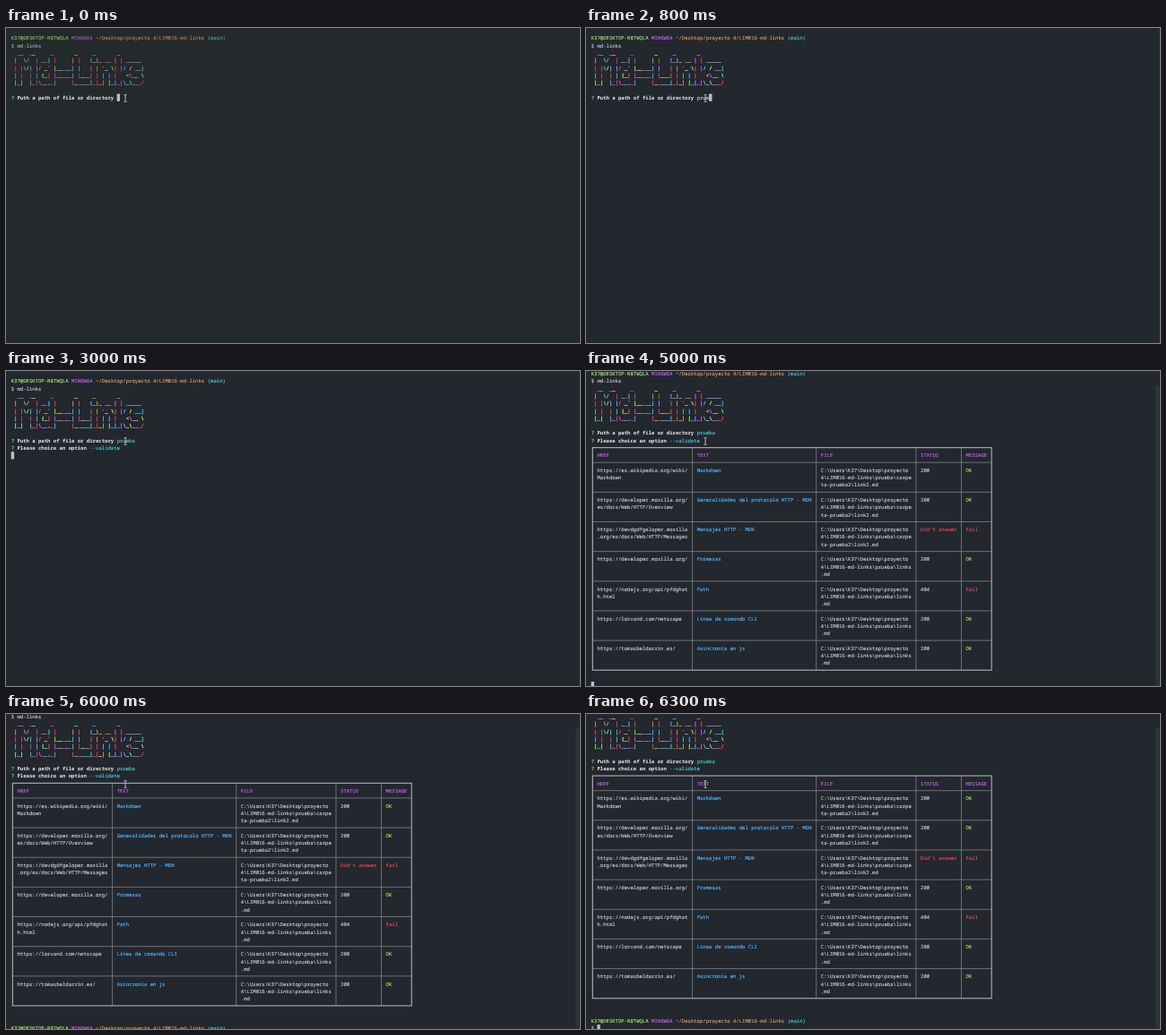
These frames come from a looping animation (640 by 352 pixels, 6400 ms). An HTML page:

```html
<!DOCTYPE html>
<html lang="en">
<head>
<meta charset="utf-8">
<title>md-links terminal</title>
<style>
  html, body { margin: 0; width: 100%; height: 100%; overflow: hidden; background: #23272e; }
  svg { display: block; width: 640px; height: 352px; }
  text {
    font: 5.617px "Noto Sans Mono", "DejaVu Sans Mono", monospace;
    white-space: pre;
    text-rendering: geometricPrecision;
    stroke: currentColor;
    stroke-width: 0.14;
  }
  .bold { font-weight: 700; stroke-width: 0; }
  .banner text { stroke-width: 0.4; }
</style>
</head>
<body>
<svg id="stage" viewBox="0 0 640 352"></svg>
<script>
const LOOP = 6400;
const CELL = 3.37, LINE = 8.29, LEFT = 5.7, TOP = 11.4;
const C = {
  fg: '#c2c8d2', white: '#ececec', red: '#e2485a', lime: '#a8e56c',
  yellow: '#d8965a', blue: '#4fb2ff', magenta: '#c45fe4', cyan: '#48c6d6'
};

const colX = c => LEFT + c * CELL;
const rowY = r => TOP + r * LINE;
const ruleY = r => rowY(r) - 0.4;

function add(parent, tag, attrs = {}, content) {
  const el = document.createElementNS('http://www.w3.org/2000/svg', tag);
  for (const k in attrs) el.setAttribute(k, attrs[k]);
  if (content !== undefined) el.textContent = content;
  return parent.appendChild(el);
}

const group = (parent, name = '') => add(parent, 'g', { class: name });

function paint(el, color) {
  el.setAttribute('fill', color);
  el.setAttribute('color', color);
}

// Each part is [string, colour, bold?]; the parts follow one another on the line.
function write(parent, row, col, ...parts) {
  for (const [str, color = C.fg, bold] of parts) {
    const el = add(parent, 'text', { x: colX(col), y: rowY(row) + 2, class: bold ? 'bold' : '' }, str);
    paint(el, color);
    col += str.length;
  }
}

function prompt(parent, row) {
  write(parent, row, 0,
    ['K37@DESKTOP-R8TWQLA', C.lime], [' MINGW64', C.magenta],
    [' ~/Desktop/proyecto 4/LIM016-md-links', C.yellow], [' (main)', C.cyan]);
}

const stage = document.getElementById('stage');
const back = add(stage, 'rect', { width: 640, height: 352 });
const bar = add(stage, 'rect', { fill: '#2d323a', height: 352 });
const screen = group(stage);

// Shell prompt and banner
const head = group(screen);
prompt(head, 0);
write(head, 1, 0, ['$ md-links']);

const banner = [
  String.raw`  __  __     _       _     _       _`,
  String.raw` |  \/  | __| |     | |   (_)_ __ | | _____`,
  String.raw` | |\/| |/ _${'`'} |_____| |   | | '_ \| |/ / __|`,
  String.raw` | |  | | (_| |_____| |___| | | | |   <\__ \ `,
  String.raw` |_|  |_|\__,_|     |_____|_|_| |_|_|\_\___/`
];
const hues = [C.red, C.lime, C.yellow, C.blue, C.magenta, C.cyan];
let seed = 24;
const pick = list => {
  seed = (seed * 16807) % 2147483647;
  return list[seed % list.length];
};
const logo = group(head, 'banner');
banner.forEach((line, r) => [...line].forEach((ch, c) => {
  if (ch !== ' ') write(logo, r + 2, c, [ch, pick(hues)]);
}));

// Questions
write(screen, 8, 0, ['? ', C.lime], ['Puth a path of file or directory', C.white, true]);
const answer = add(screen, 'text', { x: colX(35), y: rowY(8) + 2 });

const option = group(screen);
write(option, 9, 0, ['? ', C.lime], ['Please choice an option', C.white, true]);
const hint = group(screen);
write(hint, 9, 26, ['(Use arrow keys)']);
const choice = group(screen);
write(choice, 9, 26, ['--validate', C.cyan]);

const options = ['Nothing', '--validate', '--stats', '--validate --stats', '--help'];
const menus = [0, 1].map(active => {
  const g = group(screen);
  options.forEach((name, i) => write(g, 10 + i, 0,
    i === active ? ['> ' + name, C.cyan] : ['  ' + name]));
  return g;
});

// Result table
const table = group(screen);
const cols = [2, 35, 76, 109, 124];
const edges = [0, 33, 74, 107, 122, 132].map(c => colX(c + 0.5));
const dir = 'C:\\Users\\K37\\Desktop\\proyecto|4\\LIM016-md-links\\prueba\\';
const nested = dir + 'carpe|ta-prueba2\\link2.md';
const plain = dir + 'links|.md';
const links = [
  ['https://es.wikipedia.org/wiki/|Markdown', 'Markdown', nested, '200'],
  ['https://developer.mozilla.org/|es/docs/Web/HTTP/Overview',
    'Generalidades del protocolo HTTP - MDN', nested, '200'],
  ['https://devdgdfgeloper.mozilla|.org/es/docs/Web/HTTP/Messages',
    'Mensajes HTTP - MDN', nested, "Did't answer"],
  ['https://developer.mozilla.org/', 'Promesas', plain, '200'],
  ['https://nodejs.org/api/pfdghat|h.html', 'Path', plain, '404'],
  ['https://lorvand.com/netscape', 'Línea de comando CLI', plain, '200'],
  ['https://tomasbeldarrin.es/', 'Asincronía en js', plain, '200']
];

const rule = (x1, y1, x2, y2) =>
  add(table, 'path', { d: `M${x1} ${y1}L${x2} ${y2}`, stroke: '#8b9099', 'stroke-width': 0.7 });
const [x0, x1] = [edges[0], edges[5]];
edges.slice(1, -1).forEach(x => rule(x, ruleY(10), x, ruleY(40)));
for (let r = 12; r < 40; r += 4) rule(x0, ruleY(r), x1, ruleY(r));
add(table, 'rect', {
  x: x0, y: ruleY(10), width: x1 - x0, height: 30 * LINE,
  fill: 'none', stroke: '#a2a6ad', 'stroke-width': 1.2
});

['HREF', 'TEXT', 'FILE', 'STATUS', 'MESSAGE'].forEach((name, i) =>
  write(table, 11, cols[i], [name, C.magenta]));
links.forEach((link, n) => {
  const ok = link[3] === '200';
  const colors = [C.fg, C.blue, C.fg, link[3].length > 3 ? C.red : C.fg, ok ? C.lime : C.red];
  [...link, ok ? 'OK' : 'Fail'].forEach((cell, i) =>
    cell.split('|').forEach((str, k) => write(table, 13 + n * 4 + k, cols[i], [str, colors[i]])));
});

const done = group(screen);
prompt(done, 43);
write(done, 44, 0, ['$']);

// Block cursor and mouse pointer
const cursor = add(screen, 'rect', { width: CELL, height: LINE, fill: '#bcc1ca' });
add(stage, 'path', {
  d: 'M131.6 74.6h1l.5.4.5-.4h1M133.1 75v7M131.6 82.4h1l.5-.4.5.4h1',
  fill: 'none', stroke: '#e4e4e4', 'stroke-width': 0.8
});

// Step tables: [time, value...]
const typing = [[0, 0], [300, 1], [500, 2], [600, 3], [800, 4], [900, 5], [1000, 6]];
const scrolling = [[0, 0], [5000, 1], [6000, 2], [6100, 3]];
const cursors = [[0, 8, 35], [100], [300, 8, 35], [1700], [3000, 10, 0], [5000, 42, 0], [6000], [6100, 44, 2]];
const at = (steps, t) => steps.filter(s => s[0] <= t).pop();
const show = (el, on) => el.setAttribute('visibility', on ? 'visible' : 'hidden');

function render(t) {
  const typed = at(typing, t)[1];
  const scroll = at(scrolling, t)[1];
  const [, row, col] = at(cursors, t);
  const settle = Math.min(1, Math.max(0, Math.floor(t / 100 - 2) / 7));
  const wide = t >= 5000;

  back.setAttribute('fill', settle < 0.5 ? '#24292c' : '#23272e');
  head.setAttribute('opacity', 0.75 + 0.25 * settle);
  screen.setAttribute('transform', `translate(0 ${-scroll * LINE})`);

  bar.setAttribute('x', wide ? 635 : 638.5);
  bar.setAttribute('y', wide ? 16 : 0);
  bar.setAttribute('width', wide ? 5 : 1.5);
  show(bar, settle > 0);

  answer.textContent = 'prueba'.slice(0, typed);
  paint(answer, t < 1700 ? C.fg : C.cyan);
  show(option, t >= 1700);
  show(hint, t >= 1700 && t < 2500);
  show(menus[0], t >= 1700 && t < 2500);
  show(menus[1], t >= 2500 && t < 3000);
  show(choice, t >= 3000);
  show(table, t >= 5000);
  show(done, t >= 6000);

  show(cursor, row !== undefined);
  if (row !== undefined) {
    cursor.setAttribute('x', colX(col + (row === 8 ? typed : 0)));
    cursor.setAttribute('y', rowY(row) - LINE / 2);
  }
}

const start = performance.now();
function tick() {
  render((performance.now() - start) % LOOP);
  requestAnimationFrame(tick);
}
tick();
</script>
</body>
</html>
```
